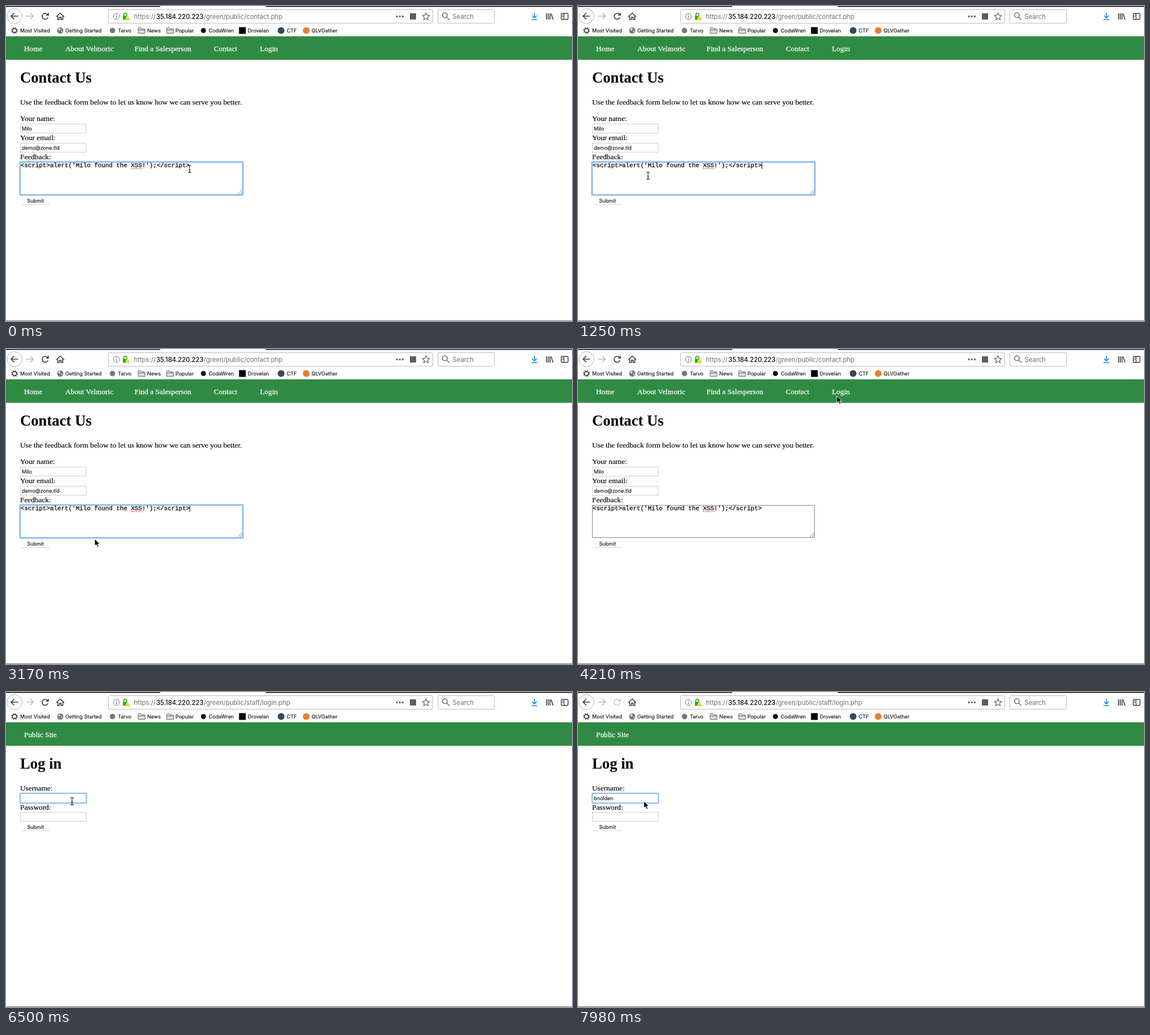
Write an HTML page that moves like this. It is 1002 px wide and 559 px high and loops after 8000 ms.

```html
<!DOCTYPE html>
<html lang="en">
<head>
<meta charset="utf-8">
<title>Feedback form</title>
<style>
  html, body { margin: 0; width: 100%; height: 100%; overflow: hidden; background: #fefefe; }
  svg { display: block; width: 1002px; height: 559px; }
  text { font: 13.3px "Liberation Serif", serif; white-space: pre; stroke: #000; stroke-width: .15px; }
  .ui text, text.ui { font: 9px Inter, sans-serif; fill: #0c0c0d; stroke-width: .1px; }
  .bar text { font-size: 11.3px; fill: #707074; stroke: none; }
  .bar .host { font-weight: 500; fill: #0c0c0d; }
  .nav text { fill: #fff; stroke: #fff; stroke-width: .25px; }
  text.title { font-size: 26.7px; font-weight: bold; stroke: none; }
  text.code { font: 10.85px "Liberation Mono", monospace; stroke-width: .25px; }
  .line { fill: none; stroke: #3e3e40; stroke-width: 1.6; }
  .field { fill: #fff; stroke: #cfcfcf; }
  .focus { fill: none; stroke: #a6cdf8; stroke-width: 2; }
  .focus .inner { stroke: #72a9e6; stroke-width: 1; }
</style>
</head>
<body>
<svg viewBox="0 0 1002 559">
  <defs>
    <path id="folder" d="M.5 10.5V1.5Q.5.5 1.5.5H5L6.5 2.5H11.5Q12.5 2.5 12.5 3.5V10.5ZM.5 4.5H12.5" fill="#ddd" stroke="#666"/>
    <g id="submit">
      <path d="M27 .5H78" stroke="#d8d8d8"/>
      <text class="ui" x="37.5" y="-3">Submit</text>
    </g>
  </defs>
  <rect width="1002" height="559" fill="#fefefe"/>
  <path d="M0 .8H273M460 .8H1002" stroke="#111" stroke-width="1.6"/>

  <!-- toolbar -->
  <g class="line">
    <circle cx="15" cy="18" r="13.3" stroke="#b5b5b8" stroke-width="1"/>
    <path d="M21.5 18H9M14.5 12.5L9 18L14.5 23.5"/>
    <path d="M36 18H48.5M43 12.5L48.5 18L43 23.5" stroke="#bcbcbe"/>
    <g id="reload"><path d="M73.5 15A5.3 5.3 0 1 0 74.3 20"/><path d="M75.8 11.5V17H70.3Z" fill="currentColor" stroke="none"/></g>
    <path id="stop" d="M63.5 12.5L74.5 23.5M74.5 12.5L63.5 23.5" stroke="#b5b5b8"/>
    <path d="M89 19L96 12.5L103 19M91.5 17.5V24H94.5V20H97.5V24H100.5V17.5"/>
    <rect x="181.5" y="6.5" width="574" height="24" rx="2" stroke="#bcbcbe" stroke-width="1"/>
    <rect x="764.5" y="6.5" width="100" height="24" rx="2" stroke="#bcbcbe" stroke-width="1"/>
    <circle cx="195.5" cy="18.5" r="5.3" stroke="#707074" stroke-width="1"/>
    <path d="M195.5 15V16.3M195.5 17.5V21.5" stroke="#707074" stroke-width="1.2"/>
    <path d="M208.5 18V15.5A2.7 2.7 0 0 1 213.9 15.5V18" stroke="#16b50c"/>
    <rect x="207" y="17.5" width="8" height="7" rx="1" fill="#16b50c" stroke="none"/>
    <path d="M214.5 16.5L219.5 25H209.5Z" fill="#ffc20a" stroke="none"/>
    <path d="M214.5 19V22M214.5 23V24" stroke="#fff" stroke-width="1"/>
    <path d="M692 18.5h0M697.2 18.5h0M702.4 18.5h0" stroke="#606064" stroke-width="3.4" stroke-linecap="round"/>
    <rect x="715" y="13" width="11" height="11" fill="#5d5d61" stroke="none"/>
    <path d="M743.5 12.3L745.4 16.4L749.8 16.9L746.5 19.9L747.4 24.3L743.5 22.1L739.6 24.3L740.5 19.9L737.2 16.9L741.6 16.4Z" stroke="#606064" stroke-width="1.2"/>
    <circle cx="777" cy="16.5" r="4.2" stroke="#707074"/>
    <path d="M780 19.5L785 24.5" stroke="#707074"/>
    <path d="M935.5 12V21M931.5 17L935.5 21L939.5 17M930.5 24.2H940.5" stroke="#0a84ff"/>
    <path d="M956.8 13V24M960 13V24M963.2 13V24M965 13.5L968.5 24"/>
    <rect x="983" y="13.2" width="12" height="10.5" rx="1.5" stroke-width="1.4"/>
    <path d="M988 13V24M984.5 16H987M984.5 18.5H987" stroke-width="1.2"/>
  </g>
  <g class="ui bar">
    <text x="226.5" y="22.5">https://</text>
    <text class="host" x="266" y="22.5">35.184.220.223</text>
    <text id="path" x="350" y="22.5"></text>
    <text x="790.5" y="22.5">Search</text>
  </g>

  <!-- bookmarks -->
  <circle cx="15" cy="43.5" r="3.6" class="line" stroke-width="1.5"/>
  <circle cx="15" cy="43.5" r="5" class="line" stroke-dasharray="1.96 1.96"/>
  <circle cx="96" cy="43.5" r="5.5" fill="#777"/>
  <path d="M92 41L95 39L97 42L94 44ZM97 45L100 43L99 47Z" fill="#ddd"/>
  <circle cx="188.5" cy="43.5" r="4.8" fill="#777"/>
  <use href="#folder" x="233.5" y="38"/>
  <use href="#folder" x="284" y="38"/>
  <circle cx="349.5" cy="43.5" r="4.5" fill="#111"/>
  <rect x="412.5" y="37.5" width="12" height="12" fill="#000"/>
  <circle cx="487" cy="43.5" r="6" fill="#34495a"/>
  <circle cx="531.5" cy="43.5" r="6" fill="#e5812d"/>
  <g class="ui" id="marks"></g>

  <path d="M0 53.5H1002" stroke="#dcdcdc"/>
  <rect y="54" width="1002" height="41.5" fill="#2f8b43"/>

  <g id="contact">
    <g class="nav">
      <text x="32" y="79.5">Home</text>
      <text x="105" y="79.5">About Velmoric</text>
      <text x="227.5" y="79.5">Find a Salesperson</text>
      <text x="368" y="79.5">Contact</text>
      <text x="449.5" y="79.5">Login</text>
    </g>
    <text class="title" x="25" y="136">Contact Us</text>
    <text x="25" y="175">Use the feedback form below to let us know how we can serve you better.</text>
    <text x="25" y="204">Your name:</text>
    <rect class="field" x="25.5" y="209.5" width="116.5" height="16"/>
    <text class="ui" x="28" y="220.8">Milo</text>
    <text x="25" y="238">Your email:</text>
    <rect class="field" x="25.5" y="243.5" width="116.5" height="16"/>
    <text class="ui" x="28" y="254.8">demo@zone.tld</text>
    <text x="25" y="272">Feedback:</text>
    <rect class="field" x="25.5" y="277.5" width="393" height="57" style="stroke:#848484"/>
    <path d="M410 334L418 326M414 334L418 330" stroke="#888"/>
    <g id="areaFocus" class="focus">
      <rect x="24" y="276" width="396" height="60" rx="1.5"/>
      <rect class="inner" x="25.5" y="277.5" width="393" height="57"/>
    </g>
    <text class="code" x="26" y="286.3">&lt;script&gt;alert('Milo found the XSS!');&lt;/script&gt;</text>
    <path d="M221.5 288.5H241" stroke="#f33" stroke-width="1.6" stroke-dasharray="1.6 1.4"/>
    <use href="#submit" y="352"/>
  </g>

  <g id="login">
    <g class="nav"><text x="32" y="79.5">Public Site</text></g>
    <text class="title" x="25" y="136">Log in</text>
    <text x="25" y="175">Username:</text>
    <rect class="field" x="25.5" y="180.5" width="116.5" height="16"/>
    <rect id="userFocus" class="focus" x="25" y="179.8" width="117.5" height="17.4" rx="1" style="stroke:#8bbcf3"/>
    <text id="user" class="ui" x="28" y="191.8"></text>
    <text x="25" y="208.5">Password:</text>
    <rect class="field" x="25.5" y="213.5" width="116.5" height="16"/>
    <use href="#submit" y="245.5"/>
    <g id="popup" style="filter:drop-shadow(0 1px 2px #0005)">
      <rect x="25" y="198" width="117.5" height="20" fill="#fff"/>
      <rect id="pick" x="25" y="200" width="117.5" height="16" fill="#d5e5fa"/>
      <text class="ui" x="28" y="211.3">bnolden</text>
    </g>
  </g>

  <path id="caret" d="M0 0V11" stroke="#000"/>
  <path d="M0 558.5H1002" stroke="#77777b"/>
  <path id="arrow" d="M0 0V12.4L2.9 9.8L5 14.5L7.2 13.5L5.2 9.1H9Z" stroke="#fff" stroke-width=".9"/>
  <path id="beam" d="M-3 -6.5Q0 -6.5 0 -4.5Q0 -6.5 3 -6.5M0 -4.5V4.5M-3 6.5Q0 6.5 0 4.5Q0 6.5 3 6.5M-1.5 1.5H1.5" fill="none" stroke="#222" stroke-width="1.1"/>
</svg>
<script>
const LOOP = 8000, $ = id => document.getElementById(id);

const marks = { 'Most Visited': 25, 'Getting Started': 105, Tarvo: 198, News: 250, Popular: 300,
  CodaWren: 359, Drovelan: 428, CTF: 497, QLVGather: 541 };
$('marks').innerHTML = Object.entries(marks)
  .map(([name, x]) => `<text x="${x}" y="47">${name}</text>`).join('');

// Bursts of screen updates: start, end, number of steps
const bursts = [[150, 1100, 7], [1250, 2290, 8], [2440, 3470, 8], [3620, 4210, 5],
  [4510, 5430, 7], [5610, 5910, 3], [6500, 7100, 5], [7400, 7980, 5]];

// Pointer path: time, x, y
const path = [[0, 325, 289], [1100, 130, 301], [1250, 124, 301], [2140, 118, 368], [2290, 120, 366],
  [2440, 122, 364], [3176, 157, 337], [3470, 185, 318], [4210, 458, 83], [4510, 450, 88],
  [5277, 125, 212], [5430, 122, 203], [5910, 117, 194], [7980, 116.5, 193.5]];

function stepped(t) {
  let held = 0;
  for (const [start, end, n] of bursts) {
    if (t < start) break;
    const gap = (end - start) / (n - 1);
    held = Math.min(end, start + Math.floor((t - start) / gap + .1) * gap);
  }
  return held;
}

function pointer(t) {
  const i = Math.max(1, path.findIndex(p => p[0] >= t));
  const [a, b] = [path[i - 1], path[i]];
  const u = (t - a[0]) / (b[0] - a[0]), k = u * u * (3 - 2 * u);
  return [a[1] + (b[1] - a[1]) * k, a[2] + (b[2] - a[2]) * k];
}

const show = (id, on) => $(id).style.display = on ? '' : 'none';
const move = (id, x, y) => $(id).setAttribute('transform', `translate(${x} ${y})`);
const inside = (x, y, top, right, bottom) => x > 24 && x < right && y > top && y < bottom;

function draw(now) {
  const t = stepped(now), login = t > 4740;
  const areaFocus = t < 4200, userFocus = t > 5700;
  const popup = t > 6750 && t < 7600, loading = login && t < 5600;

  show('contact', !login);
  show('login', login);
  show('areaFocus', areaFocus);
  show('userFocus', userFocus);
  show('popup', popup);
  show('pick', t > 7390);
  show('stop', loading);
  show('reload', !loading);
  const tint = t > 7900 ? '#cbcbcd' : '#3e3e40';
  $('reload').style.stroke = $('reload').style.color = tint;
  $('path').textContent = login ? '/green/public/staff/login.php' : '/green/public/contact.php';
  $('user').textContent = t > 7500 ? 'bnolden' : t > 6600 ? 'b' : '';

  const blink = now % 1000;
  show('caret', (areaFocus || userFocus) && blink > 100 && blink < 490);
  if (login) move('caret', 28.5 + Math.ceil($('user').getComputedTextLength()), 183);
  else move('caret', 325.5, 278);

  const [x, y] = pointer(t);
  const beam = login ? inside(x, y, 179, 143, 198) && !popup && t < 7600
    : inside(x, y, 276, 420, 336);
  show('beam', beam);
  show('arrow', !beam);
  move(beam ? 'beam' : 'arrow', x, y);
}

const begin = performance.now();
(function tick() {
  draw((performance.now() - begin) % LOOP);
  requestAnimationFrame(tick);
})();
</script>
</body>
</html>
```
